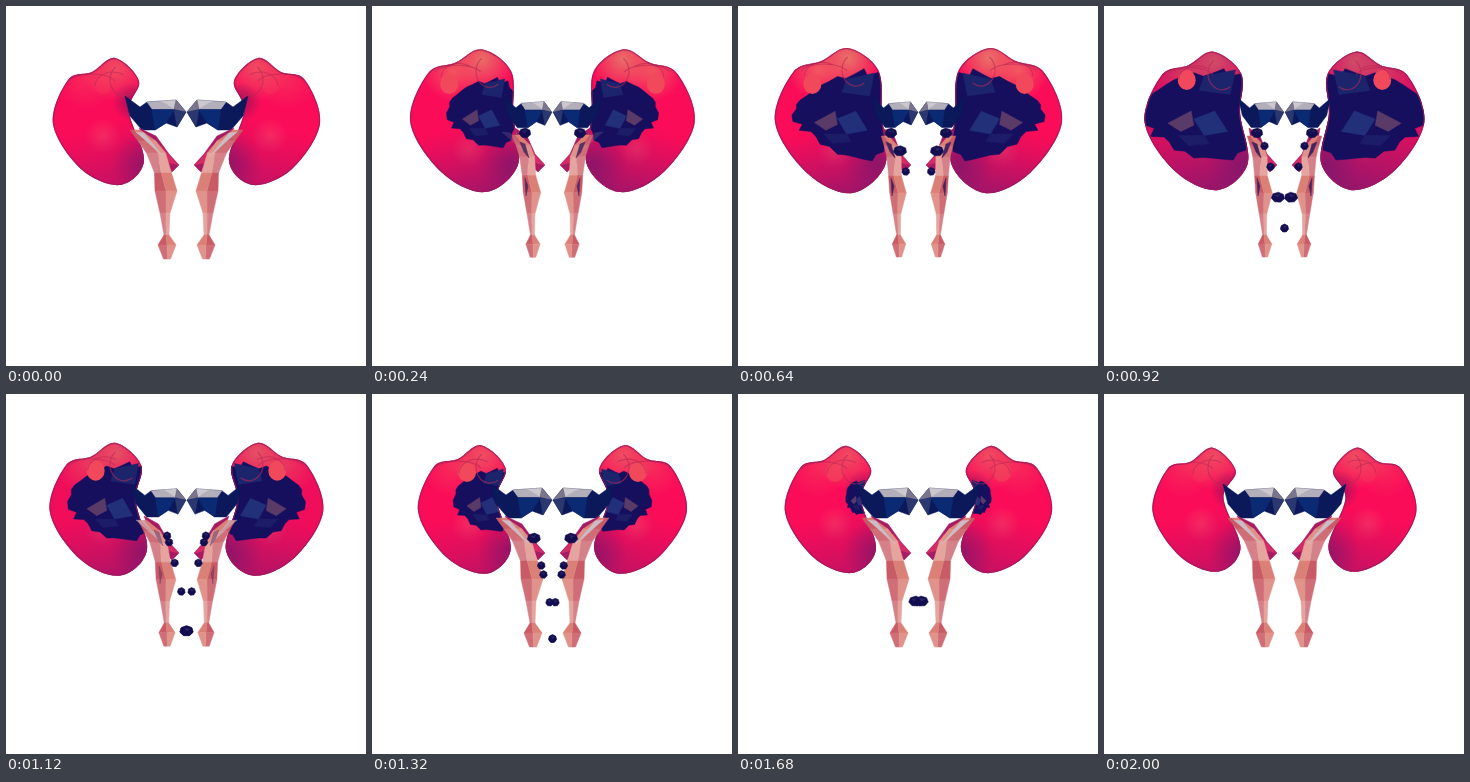
An HTML page with a canvas for the animation above (2040 ms loop, 360x360 px).

```html
<!DOCTYPE html>
<html lang="en">
<head>
<meta charset="utf-8">
<title>Kidneys</title>
<style>
  html, body { margin: 0; width: 100%; height: 100%; overflow: hidden; background: #fff; }
  canvas { display: block; width: 360px; height: 360px; }
</style>
</head>
<body>
<canvas id="stage" width="360" height="360"></canvas>
<script>
const ctx = document.getElementById('stage').getContext('2d');
const LOOP = 2040, STEP = 40, NAVY = '#150f5e';

// Key points of the kidney at rest and swollen
const bodyRest = [[47, 118], [62, 74], [86, 66], [109, 52], [133, 75], [123, 105], [138, 155], [114, 179], [75, 163]];
const bodyFull = [[36, 116], [54, 66], [83, 54], [110, 41], [141, 63], [146, 110], [148, 160], [113, 188], [68, 167]];

// Ureter stations: centre x, y, width
const tube = [[129, 124, 10], [141, 135, 18], [150, 147, 19], [157, 167, 17], [160, 185, 22],
  [159, 207, 10], [160.5, 229, 5], [161, 239, 18], [161, 253, 7]];

const births = [310, 450, 620, 770, 905, 955, 1135];

const mix = (a, b, k) => a + (b - a) * k;
const ramp = (t, a, b) => Math.min(1, Math.max(0, (t - a) / (b - a)));
const ease = (t, a, b) => { const k = ramp(t, a, b); return k * k * (3 - 2 * k); };
const noise = i => { const v = Math.sin(i * 127.1 + 3) * 43758.5; return (v - Math.floor(v)) * 2 - 1; };

function pose(t) {
  return {
    swell: ease(t, 0, 340) * (1 - ease(t, 440, 1500)) - 0.15 * ramp(t, 1700, 2000),
    turn: ease(t, 0, 320) * (1 - ease(t, 920, 1280)),
    open: ramp(t, 0, 340) * (1 - ramp(t, 950, 1900)),
    tear: ease(t, 640, 920) * (1 - ease(t, 920, 1240)),
  };
}

function fill(color, points) {
  ctx.beginPath();
  points.forEach(p => ctx.lineTo(...p));
  ctx.closePath();
  ctx.fillStyle = ctx.strokeStyle = color;
  ctx.lineWidth = 0.5;
  ctx.fill();
  ctx.stroke();
}

// Closed Catmull-Rom curve
function smooth(points) {
  const n = points.length, at = i => points[(i + n) % n];
  ctx.beginPath();
  ctx.moveTo(...points[0]);
  for (let i = 0; i < n; i++) {
    const [p, a, b, q] = [at(i - 1), at(i), at(i + 1), at(i + 2)];
    ctx.bezierCurveTo(a[0] + (b[0] - p[0]) / 6, a[1] + (b[1] - p[1]) / 6,
      b[0] - (q[0] - a[0]) / 6, b[1] - (q[1] - a[1]) / 6, ...b);
  }
}

function glow(x, y, r, rgb, alpha) {
  const g = ctx.createRadialGradient(x, y, 0, x, y, r);
  g.addColorStop(0, `rgba(${rgb},${alpha})`);
  g.addColorStop(1, `rgba(${rgb},0)`);
  ctx.fillStyle = g;
  ctx.fillRect(x - r, y - r, 2 * r, 2 * r);
}

function arc(x, y, rx, ry, from, to) {
  ctx.beginPath();
  ctx.ellipse(x, y, rx, ry, 0, from * Math.PI, to * Math.PI);
  ctx.strokeStyle = 'rgba(185,40,85,.6)';
  ctx.lineWidth = 1.2;
  ctx.stroke();
}

function drawHole({ open, tear }) {
  const cx = mix(124, 104, open) - 9 * tear, cy = mix(102, 109, open);
  const rx = 46 * open + 6 * tear, ry = 38 * open ** 0.6 + 3 * tear;
  const lean = 0.5 * open - 0.2 * tear;
  const place = (a, r) => {
    const c = Math.cos(a), s = Math.sin(a);
    return [cx + rx * r * c, cy + ry * r * Math.sign(s) * Math.abs(s) ** 0.7 * (1 + lean * c)];
  };
  const edge = Array.from({ length: 34 }, (_, i) => place(i * Math.PI / 17, 1 + 0.1 * noise(i)));
  fill(NAVY, edge);
  const local = (...points) => points.map(([x, y]) => [cx + rx * x, cy + ry * y]);
  fill('#1c246c', local([0.1, -0.95], [0.7, -1.1], [0.6, -0.5], [0, -0.6]));
  fill('#5a3a66', local([-0.6, 0.2], [-0.15, -0.1], [-0.1, 0.25], [-0.35, 0.4]));
  fill('#22307a', local([-0.1, 0.1], [0.3, -0.1], [0.55, 0.4], [0.1, 0.5]));
  fill('#1d1c66', local([-0.4, 0.5], [0.1, 0.5], [0.2, 0.7], [-0.2, 0.75]));
}

function drawBody(now) {
  const { swell, tear } = now, grow = Math.max(0, swell);
  const shape = bodyRest.map((p, i) => p.map((v, j) => mix(v, bodyFull[i][j], swell)));
  const top = 52 - 11 * grow, bottom = 179 + 9 * grow, lobe = 97 - 25 * grow;
  ctx.save();
  smooth(shape);
  ctx.clip();
  ctx.fillStyle = '#fa0c58';
  ctx.fillRect(30, 30, 130, 170);
  glow(110, top + 10, 34, '232,118,104', 0.6 + 0.4 * grow);
  glow(80, top + 22, 30, '240,102,98', 0.3 + 0.6 * grow);
  glow(97, 130 + 17 * grow, 18, '255,100,115', 0.35);
  glow(139, 158, 34, '110,20,104', 0.65);
  glow(126, 96, 20, '120,18,90', 0.7 * (1 - grow));
  const shade = ctx.createLinearGradient(90, 120, 108, bottom);
  shade.addColorStop(0, `rgba(140,24,112,${0.3 * tear})`);
  shade.addColorStop(1, `rgba(120,24,112,${0.4 + 0.3 * grow + 0.2 * tear})`);
  ctx.fillStyle = shade;
  ctx.fillRect(30, 30, 130, 170);

  drawHole(now);

  ctx.beginPath();
  ctx.ellipse(lobe, 78 - 4 * tear, 9, 10, 0, 0, 7);
  ctx.fillStyle = `rgba(242,72,92,${0.2 + 0.8 * Math.min(1, now.open * 2)})`;
  ctx.fill();
  arc(lobe + 10, top + 28, 18, 14, 1, 1.7);
  arc(118, top + 22, 14, 16, 0.3, 1.3);
  arc(86, top + 26, 24, 10, 1.1, 1.9);

  smooth(shape);
  ctx.strokeStyle = 'rgba(150,28,92,.7)';
  ctx.lineWidth = 2.5;
  ctx.stroke();
  ctx.restore();
}

function drawVein(turn) {
  const facet = (color, ...points) => fill(color, points.map(([x, y]) =>
    [179 - (179 - x) * (1 - 0.26 * turn), 107 + (y - 107) * (1 - 0.15 * turn)]));
  facet('#0b185a', [119, 90], [134, 101], [141, 96], [170, 94], [180, 106], [171, 121],
    [160, 117], [149, 124], [136, 124], [124, 110]);
  facet('#b3afba', [141, 96], [155, 95], [168, 103], [146, 103]);
  facet('#cdc8cd', [155, 95], [170, 94], [168, 103]);
  facet('#7a758c', [170, 94], [180, 106], [168, 103]);
  facet('#0b2a74', [146, 104], [168, 104], [160, 117], [149, 124]);
  facet('#2a386f', [168, 104], [180, 106], [171, 121]);
}

function drawTube(turn) {
  const shift = 12 * turn;
  fill('#a81a62', [[133 + shift, 122], [150 + shift / 2, 130], [163, 148], [173, 159], [166, 166], [150, 152]]);
  fill('#d42c66', [[155, 140], [164, 150], [172, 159], [160, 156]]);
  const rows = tube.map(([x, y, w], i) => {
    const cx = x + turn * Math.max(0, 18 - 6 * i), cy = y + turn * (6 - i), half = w / 2 * (1 - 0.25 * turn);
    return [-half, half * 0.2 * (i % 3 - 1), half].map(d => [cx + d, cy]);
  });
  for (let i = 0; i < rows.length - 1; i++) {
    const [a, b] = [rows[i], rows[i + 1]];
    fill(`hsl(354 50% ${57 + 5 * (i % 3)}%)`, [a[0], a[1], b[1], b[0]]);
    fill(`hsl(6 58% ${66 + 5 * (i % 3)}%)`, [a[1], a[2], b[2], b[1]]);
  }
  ctx.globalAlpha = 1 - turn;
  fill('#cbbcc6', [[130, 126], [138, 127], [157, 150], [138, 133]]);
  ctx.globalAlpha = turn;
  fill('#45235f', [[148, 136], [153, 138], [157, 152], [152, 146]]);
  fill('#45235f', [[153, 172], [156, 180], [154, 190]]);
  ctx.globalAlpha = 1;
}

function bead(x, y, rx, ry) {
  const ring = Array.from({ length: 7 }, (_, i) => {
    const a = i * Math.PI * 2 / 7 + 0.3;
    return [x + rx * Math.cos(a), y + ry * Math.sin(a)];
  });
  fill('#110d50', ring);
  fill('#28245f', [[x - rx / 2, y - ry * 0.4], [x + rx * 0.3, y - ry * 0.6], [x, y]]);
}

function drawDrops(t, turn) {
  if (turn > 0.8) bead(153, 127, 6, 5);
  births.forEach((birth, i) => {
    const age = t - birth, y = 125 + 0.08 * age + 0.00013 * age * age;
    if (age < 0 || y > 250) return;
    const x = 154 + 26.5 * Math.min(1, (y - 125) / 97) ** 0.75;
    const r = Math.min(1, 0.7 + age / 500) * 4, big = i % 5 === 1;
    bead(x, y, big ? r * 1.7 : r, big ? r * 1.3 : r);
  });
}

function drawSide(t) {
  const now = pose(t);
  drawBody(now);
  drawVein(now.turn);
  drawTube(now.turn);
  drawDrops(t, now.turn);
}

let start;
function run(time) {
  start ??= time;
  const t = Math.floor((time - start) % LOOP / STEP) * STEP;
  ctx.setTransform(1, 0, 0, 1, 0, 0);
  ctx.clearRect(0, 0, 360, 360);
  drawSide(t);
  ctx.setTransform(-1, 0, 0, 1, 361, 0);
  drawSide(t);
  requestAnimationFrame(run);
}
requestAnimationFrame(run);
</script>
</body>
</html>
```
